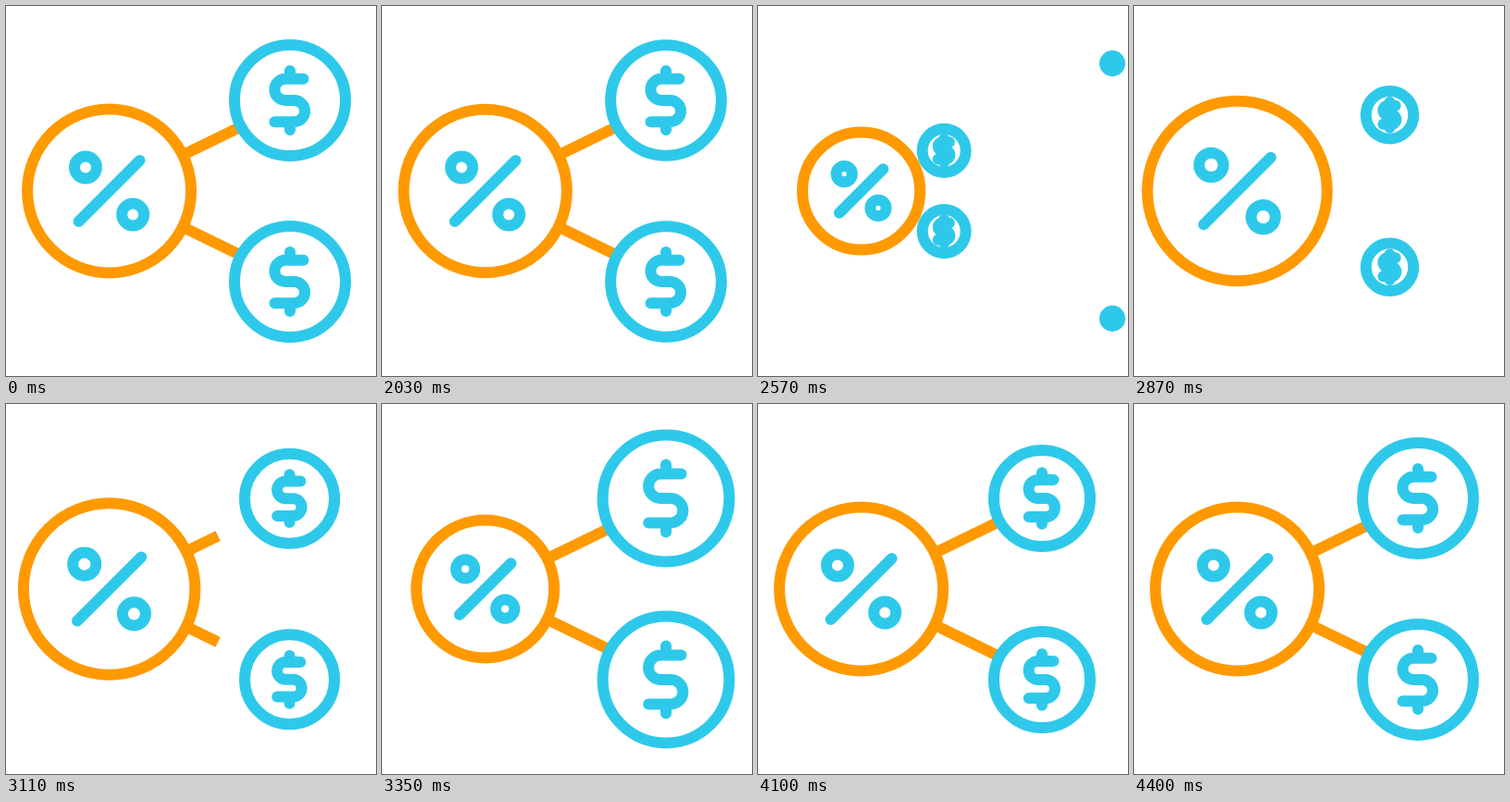
An HTML page with a canvas that plays this animation: 400 px wide and 400 px high, repeating every 4.43 s.

```html
<!DOCTYPE html>
<html lang="en">
<head>
<meta charset="utf-8">
<title>Commission split</title>
<style>
  html, body { margin: 0; width: 100%; height: 100%; overflow: hidden; background: #fff; }
  canvas { display: block; width: 400px; height: 400px; }
</style>
</head>
<body>
<canvas id="stage"></canvas>
<script>
const LOOP = 4430, START = 2030, STEP = 30;
const ORANGE = '#ff9900', BLUE = '#2ec9ea';
const HUB = { x: 111.6, y: 200 };
const COIN = { x: 307, y: 102 };

// Keyframes are [time, value] pairs, eased in and out.
const hubScale = [[2000, 1], [2507, 0.694], [2950, 1.136], [3403, 0.83], [4027, 1]];
const coinScale = [[2790, 0.392], [3390, 1.15], [3440, 1.15], [3890, 0.8], [4430, 1]];
const oldScale = [[2010, 1], [2737, 0]];
const travel = [[2060, 0], [3140, 1]];
const lineOut = [[2010, 0], [2470, 1]];
const lineIn = [[2870, 0], [3300, 1]];

const canvas = document.getElementById('stage');
const ctx = canvas.getContext('2d');
const ratio = window.devicePixelRatio || 1;
canvas.width = canvas.height = 400 * ratio;

const mix = (a, b, p) => a + (b - a) * p;

function valueAt(keys, t) {
  if (t <= keys[0][0]) return keys[0][1];
  for (let i = 1; i < keys.length; i++) {
    const [t0, a] = keys[i - 1], [t1, b] = keys[i];
    if (t < t1) {
      const x = (t - t0) / (t1 - t0);
      return mix(a, b, x * x * (3 - 2 * x));
    }
  }
  return keys[keys.length - 1][1];
}

function stroke(color, build, fill) {
  ctx.beginPath();
  build();
  if (fill) {
    ctx.fillStyle = '#fff';
    ctx.fill();
  }
  ctx.strokeStyle = color;
  ctx.stroke();
}

function ring(x, y, r, color, fill) {
  stroke(color, () => ctx.arc(x, y, r, 0, Math.PI * 2), fill);
}

function coin(x, y, s) {
  const px = v => x + v * s, py = v => y + v * s;
  ring(x, y, 60 * s, BLUE, true);
  stroke(BLUE, () => {
    ctx.moveTo(px(14.5), py(-23.2));
    ctx.arc(px(-5), py(-11.6), 11.6 * s, -Math.PI / 2, Math.PI / 2, true);
    ctx.arc(px(4.5), py(11.6), 11.6 * s, -Math.PI / 2, Math.PI / 2);
    ctx.lineTo(px(-16.5), py(23.2));
    for (const dir of [-1, 1]) {
      ctx.moveTo(x, py(23.2 * dir));
      ctx.lineTo(x, py(32 * dir));
    }
  });
}

function hub(s) {
  const { x, y } = HUB;
  ring(x, y, 88.5 * s, ORANGE, true);
  for (const dir of [-1, 1]) ring(x + 25.6 * s * dir, y + 25.6 * s * dir, 12 * s, BLUE);
  stroke(BLUE, () => {
    ctx.moveTo(x + 33 * s, y - 33 * s);
    ctx.lineTo(x - 33 * s, y + 33 * s);
  });
}

// Part of the connector, from 0 at the hub to 1 at the coin.
function connector(from, to, side) {
  if (to <= from) return;
  const point = p => {
    const k = mix(0.32, 0.8, p);
    return [mix(HUB.x, COIN.x, k), HUB.y + 95.5 * k * side];
  };
  ctx.lineCap = 'butt';
  stroke(ORANGE, () => {
    ctx.moveTo(...point(from));
    ctx.lineTo(...point(to));
  });
  ctx.lineCap = 'round';
}

function draw(t) {
  ctx.setTransform(ratio, 0, 0, ratio, 0, 0);
  ctx.fillStyle = '#fff';
  ctx.fillRect(0, 0, 400, 400);
  ctx.lineWidth = 12;
  ctx.lineCap = ctx.lineJoin = 'round';

  const p = valueAt(travel, t);
  const old = valueAt(oldScale, t);
  for (const side of [-1, 1]) {
    connector(valueAt(lineOut, t), 1, side);
    connector(0, valueAt(lineIn, t), side);
    if (old > 0) coin(COIN.x + 166 * p, HUB.y + (98 + 87 * p) * side, old);
    if (p > 0) coin(mix(HUB.x, COIN.x, p), HUB.y + mix(-2.4, 98, p) * side, valueAt(coinScale, t));
  }
  hub(valueAt(hubScale, t));
}

function frame() {
  const t = performance.now() % LOOP;
  draw(t < START ? 0 : START + Math.floor((t - START) / STEP) * STEP);
  requestAnimationFrame(frame);
}
frame();
</script>
</body>
</html>
```
